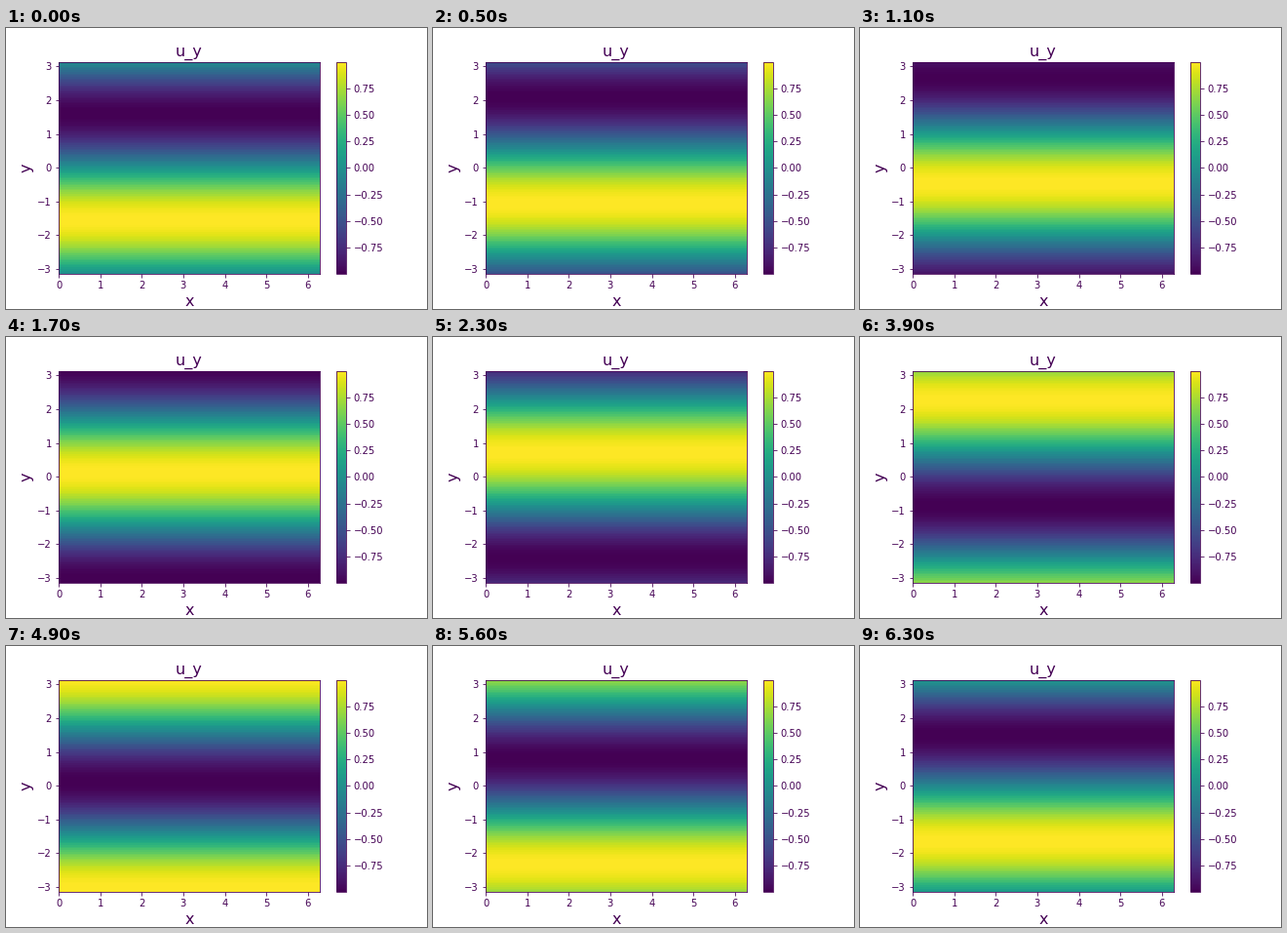
Write a matplotlib script that moves like this. It is 432x288 px and loops after 6.4 s.

```python
import numpy as np
import matplotlib.pyplot as plt
from matplotlib.animation import FuncAnimation

FRAMES = 64
ROWS = 128
INK = "#440154"

plt.rcParams.update({
    "font.family": "DejaVu Sans",
    "font.size": 10,
    "axes.edgecolor": INK,
    "axes.labelcolor": INK,
    "axes.titlecolor": INK,
    "text.color": INK,
    "xtick.color": INK,
    "ytick.color": INK,
})

y = np.linspace(-np.pi, np.pi, ROWS)


def velocity(frame):
    """Sine wave travelling upwards, one period per loop."""
    shift = 2 * np.pi * frame / FRAMES
    return -np.sin(y[:-1] - shift)[:, None]


fig, ax = plt.subplots(figsize=(6, 4), dpi=72)
fig.subplots_adjust(left=0.125, right=0.9, bottom=0.125, top=0.88)

mesh = ax.pcolormesh([0, 2 * np.pi], y, velocity(0), cmap="viridis",
                     vmin=-0.998, vmax=0.998)
ax.set_xlim(0, 2 * np.pi)
ax.set_ylim(-np.pi, np.pi)
ax.set_xticks(range(7))
ax.set_yticks(range(-3, 4))
ax.set_title("u_y", fontsize=16)
ax.set_xlabel("x", fontsize=16)
ax.set_ylabel("y", fontsize=16)

bar = fig.colorbar(mesh, ax=ax, ticks=np.arange(-0.75, 1, 0.25))
bar.outline.set_edgecolor(INK)


def update(frame):
    mesh.set_array(velocity(frame))
    return (mesh,)


anim = FuncAnimation(fig, update, frames=FRAMES, interval=100,
                     repeat=True, repeat_delay=0)
plt.show()
```
